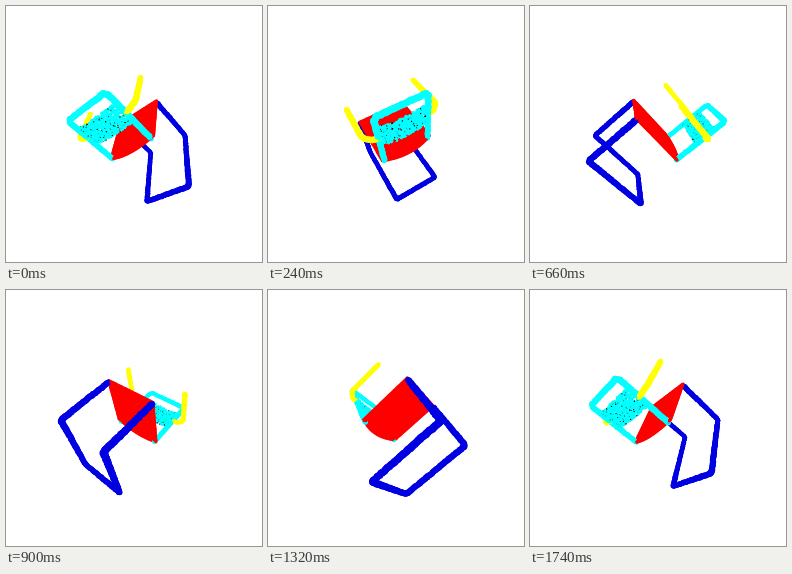
Write an HTML page with a canvas that moves like this. It is 256x256 px and loops after 1800 ms.

```html
<!DOCTYPE html>
<html>
<head>
<meta charset="utf-8">
<title>Turning chair</title>
<style>
html, body { margin: 0; height: 100%; overflow: hidden; background: #fff; }
canvas { display: block; }
</style>
</head>
<body>
<canvas id="stage" width="256" height="256"></canvas>
<script>
const ctx = document.getElementById('stage').getContext('2d');
const DIST = 215, CENTER = 128, STEPS = 30, STEP_MS = 60;
const BLUE = '#0000e0', CYAN = '#00ffff', YELLOW = '#ffff00', RED = '#ff0000', BLACK = '#000';

// Chair axes in space: across the seat, front to back, downwards
const across = [-0.757, 0.435, 0.487];
const back = [-0.125, 0.662, -0.739];
const down = [0.643, 0.621, 0.447];

let seed = 7;
function random() {
  seed = (seed * 16807) % 2147483647;
  return seed / 2147483647;
}
const jitter = size => (random() - 0.5) * size;

const dots = [];
function addDot(p, q, r, radius, color) {
  const [x, y, z] = [0, 1, 2].map(i => p * across[i] + q * back[i] + r * down[i]);
  dots.push({ x, y, z, radius, color });
}

function addTube(points, radius, color) {
  for (let i = 1; i < points.length; i++) {
    const a = points[i - 1], b = points[i];
    const n = Math.ceil(Math.hypot(b[0] - a[0], b[1] - a[1], b[2] - a[2]) / 0.9);
    for (let k = 0; k <= n; k++) {
      const at = a.map((v, j) => v + (b[j] - v) * k / n + jitter(0.7));
      addDot(...at, radius, color);
    }
  }
}

function buildSeat() {
  for (let p = -26.5; p <= 26.5; p += 1.4) {
    const end = 20.5 + 6 * (1 - (p / 26.5) ** 2);
    const n = Math.ceil((end + 35) / 1.4);
    for (let k = 0; k <= n; k++) addDot(p, -35 + (end + 35) * k / n, -1, 1.5, RED);
  }
}

function buildPanel() {
  for (let i = 0; i < 760; i++) {
    const p = jitter(44), r = -34.5 + jitter(23);
    const q = 21 + 3 * (1 - (p / 22) ** 2) + jitter(1.5);
    const dark = i % 5 === 0;
    addDot(p, q, r, dark ? 0.6 : 1.2, dark ? BLACK : CYAN);
  }
}

function buildFrame() {
  const mirror = points => points.map(([p, q, r]) => [-p, q, r]).reverse();
  const leg = [[25.5, -34.5, 1], [25.5, -34, 55.5], [25.4, -32.5, 57], [25, 35, 57.7], [23.5, 36.5, 57.7]];
  const post = [[23.5, 21.5, -0.5], [23.5, 21, -54], [21, 21, -57]];
  const arm = [[35, -22, -36], [35, 14, -36], [33, 18, -35.5], [29, 21, -35], [24, 21.5, -34]];
  addTube([...leg, ...mirror(leg)], 2.7, BLUE);
  addTube([...post, ...mirror(post)], 2.5, CYAN);
  addTube(arm, 2.4, YELLOW);
  addTube(mirror(arm), 2.4, YELLOW);
}

function project(dot, cos, sin) {
  const z = dot.x * sin + dot.z * cos;
  const scale = DIST / (DIST + z);
  return {
    z,
    x: CENTER + (dot.x * cos - dot.z * sin) * scale,
    y: CENTER + dot.y * scale,
    radius: dot.radius * scale,
    color: dot.color
  };
}

function draw(step) {
  const angle = step / STEPS * 2 * Math.PI;
  const cos = Math.cos(angle), sin = Math.sin(angle);
  ctx.fillStyle = '#fff';
  ctx.fillRect(0, 0, 256, 256);
  const view = dots.map(dot => project(dot, cos, sin)).sort((a, b) => b.z - a.z);
  for (const { x, y, radius, color } of view) {
    ctx.fillStyle = color;
    ctx.beginPath();
    ctx.arc(x, y, radius, 0, 2 * Math.PI);
    ctx.fill();
  }
}

buildSeat();
buildPanel();
buildFrame();

const start = performance.now();
let shown = -1;
function tick() {
  const step = Math.floor((performance.now() - start) / STEP_MS) % STEPS;
  if (step !== shown) draw(shown = step);
  requestAnimationFrame(tick);
}
tick();
</script>
</body>
</html>
```
